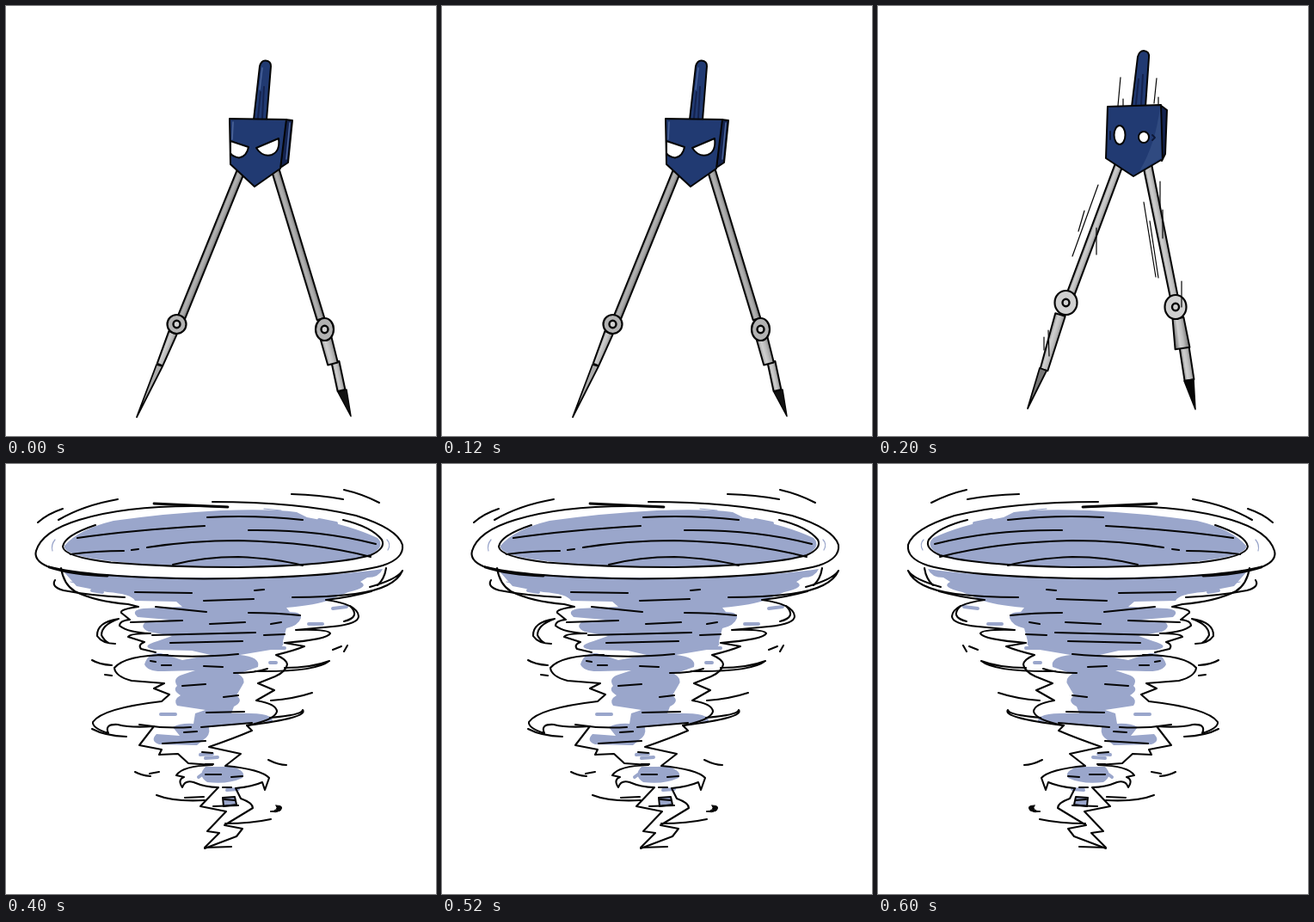
These frames come from a looping animation (500 by 500 pixels, 0.8 s). An HTML page with a canvas:

```html
<!DOCTYPE html>
<html lang="en">
<head>
<meta charset="utf-8">
<title>Whirling compass</title>
<style>
html, body { margin: 0; width: 100%; height: 100%; overflow: hidden; background: #fff; }
canvas { display: block; width: 500px; height: 500px; }
</style>
</head>
<body>
<canvas id="stage" width="500" height="500"></canvas>
<script>
const ctx = document.getElementById('stage').getContext('2d');
const INK = '#050505', NAVY = '#213a72', DEEP = '#14234f', BLUE = '#9aa6cb';
const STEP = 200;

function stroke(d, width = 2.1, color = INK) {
  ctx.lineWidth = width;
  ctx.strokeStyle = color;
  ctx.stroke(new Path2D(d));
}

function shape(d, fill, width = 2) {
  ctx.fillStyle = fill;
  ctx.fill(new Path2D(d));
  if (width) stroke(d, width);
}

function oval(x, y, rx, ry, fill, width = 2) {
  ctx.beginPath();
  ctx.ellipse(x, y, rx, ry, 0, 0, Math.PI * 2);
  ctx.fillStyle = fill;
  ctx.fill();
  ctx.lineWidth = width;
  ctx.strokeStyle = INK;
  ctx.stroke();
}

// Metal rod between two points, shaded across its width.
function rod(x1, y1, x2, y2, w1, w2, tones) {
  const len = Math.hypot(x2 - x1, y2 - y1);
  const nx = (y1 - y2) / len, ny = (x2 - x1) / len;
  const a = w1 / 2, b = w2 / 2;
  const g = ctx.createLinearGradient(x1 + nx * a, y1 + ny * a, x1 - nx * a, y1 - ny * a);
  tones.forEach((c, i) => g.addColorStop(i / (tones.length - 1), c));
  shape(`M${x1 + nx * a} ${y1 + ny * a}L${x2 + nx * b} ${y2 + ny * b}` +
        `L${x2 - nx * b} ${y2 - ny * b}L${x1 - nx * a} ${y1 - ny * a}Z`, g);
}

function joint(x, y, rx, ry, fill) {
  oval(x, y, rx, ry, fill, 2.2);
  oval(x, y, 4, 4.2, '#d2d2d2', 2.4);
}

function compassWide() {
  const steel = ['#777', '#b4b4b4', '#a2a2a2', '#686868'];
  const pale = ['#999', '#d0d0d0', '#b8b8b8', '#888'];
  rod(273, 192, 204, 362, 9, 9, steel);
  rod(313, 190, 366, 364, 9, 9, steel);
  rod(194, 380, 179, 417, 10, 7, pale);
  shape('M175 417L182 419L152 478Z', '#aaa', 1.8);
  rod(383, 414, 390, 447, 9, 9, pale);
  rod(372, 386, 380, 416, 13, 12, pale);
  shape('M386 449L396 446L401 477Z', '#111', 1.5);
  joint(198.5, 370, 11, 11, '#b2b2b2');
  joint(370.5, 376, 10.5, 13, '#b2b2b2');

  shape('M288 132L295 70Q297 63 302 63.5Q308 64 308 70L303 132Z', NAVY);
  stroke('M293 130L296 100M298 130L300 94', 2, DEEP);
  stroke('M298 72L295 97', 1.5, '#4a649c');
  shape('M325 132L333 133L328 182L319 188Z', DEEP);
  shape('M260 131L326 132L319 189L289 210L261 184Z', NAVY);
  stroke('M264 135L263 155M330 136L326 178', 1.6, '#4c659b');
  shape('M261 157L282 164Q280 175 271 176.5Q263 175 261 171Z', '#fff');
  shape('M291 165L317 154Q319 169 309 173Q298 176 291 165Z', '#fff');
}

function compassClosing() {
  const steel = ['#888', '#d0d0d0', '#bdbdbd', '#888'];
  rod(280, 185, 224, 335, 9, 9, steel);
  rod(313, 184, 344, 337, 10, 9, steel);
  rod(212, 359, 193, 423, 12, 9, steel);
  shape('M188 421L196 424L174 468Z', '#777', 1.8);
  rod(356, 396, 362, 435, 11, 11, steel);
  rod(349, 363, 354, 398, 13, 17, steel);
  shape('M356 436L367 434L369 469Z', '#050505', 1.5);
  joint(218.5, 345, 13, 14, '#d0d0d0');
  joint(346, 350, 12.5, 14, '#d0d0d0');

  shape('M295 117L302 59Q304 52 309 52Q316 53 315 60L311 117Z', NAVY);
  stroke('M300 114L303 85M306 114L308 80', 2, DEEP);
  shape('M328 115L336 121L334 172L330 180Z', DEEP);
  shape('M267 117L329 115L331 178L297 198L265 177Z', NAVY);
  shape('M328 117L329 177L304 192Q323 160 328 117Z', '#304a80', 0);
  oval(281, 150, 6.5, 11, '#fff');
  oval(309, 152.5, 6, 6.5, '#fff');
  stroke('M270 146V155M319 150L322 153L319 156', 1.8, '#0c1736');
  stroke('M282 83L279 116M324 84L321 113M285 108V116M326 106V114' +
    'M256 208L226 291M240 238L233 262M254 258V289' +
    'M309 228L323 315M316 250L326 316M328 204V235M331 237V270' +
    'M353 320V350M198 377L199 407M193 385V400', 1.2);
}

function funnelColor() {
  shape('M68 95Q84 76 125 66Q190 57 250 54Q310 52 338 56L350 62Q400 71 432 86' +
    'Q443 97 420 107Q380 118 270 119.5Q150 119 95 109Q66 103 68 95Z', BLUE, 0);
  shape('M67 125Q180 135 330 131Q400 128 438 122Q434 132 420 132L412 137' +
    'Q424 143 398 149L376 158Q362 164 326 167L330 172Q344 172 343 179' +
    'Q340 188 326 191L322 206Q325 214 308 216L272 222Q296 224 293 236' +
    'L270 244Q280 250 275 257L268 269Q277 276 265 282L262 290' +
    'Q312 288 310 299L236 306Q238 316 229 321L222 327L178 326' +
    'Q167 322 175 314L202 316L194 306Q203 301 218 302L220 290' +
    'L232 286L199 281Q194 274 203 269Q193 263 199 258Q193 249 205 245' +
    'L220 240L184 241Q165 242 161 233Q165 219 180 220L205 228L238 222' +
    'L216 217L172 216Q155 212 176 206L193 200L166 195Q155 190 162 184' +
    'L190 181L153 178Q144 170 160 168L205 166L198 160L150 159Q146 151 118 149' +
    'L82 142Z', BLUE, 0);
  shape('M232 352H263Q280 357 275 365Q258 373 234 370Q222 362 232 352Z', BLUE, 0);
  shape('M252 388L266 387L268 396L253 398Z', BLUE, 2);
  stroke('M257 379L270 378M232 342L246 341M226 338L240 337M228 361L224 364' +
    'M352 186H368M380 168L396 166M305 214H324M307 231H314' +
    'M180 291H197M100 147L112 149M405 81H412M364 65L384 69', 4, BLUE);
  stroke('M75 137L98 142M300 52L320 54M57 88Q52 94 54 101M443 88Q448 93 444 100', 1.2, BLUE);
}

function funnelRim() {
  stroke('M258 50Q150 45 85 65Q42 78 35 101Q32 112 48 119Q96 132 230 133.5' +
    'Q390 132 438 118Q463 110 461 94Q455 75 407 60Q340 44 240 44');
  stroke('M172 46L258 50M50 120Q78 129 118 130', 2.8);
  stroke('M104 71Q68 83 66 96Q67 108 122 114.500Q190 120 270 120' +
    'Q382 118 424 106Q442 98 437 88Q425 73 392 65');
  stroke('M83 86Q145 77 231 72M234 62Q290 59 345 65M282 77Q365 76 430 93' +
    'M75 105Q105 101 137 101M146 100L154 99M164 97Q215 89 270 89Q360 91 424 108' +
    'M194 117Q230 108 270 108Q315 110 345 118');
}

function funnelEdges() {
  // Left side
  stroke('M64 121Q67 140 80 148Q104 160 142 163L154 166Q132 169 134 173L144 181' +
    'Q132 182 132 188Q142 196 168 197Q144 197 142 201L161 207Q153 210 157 215L174 219' +
    'M188 222Q139 222 126 237Q127 247 146 252L184 255L172 261L190 268L181 276' +
    'Q112 284 101 300Q100 307 119 313Q114 302 130 303Q145 307 172 305' +
    'L155 327L181 332L178 338L200 337L212 348L240 350' +
    'Q205 351 198 362L207 364Q199 367 205 376Q208 367 218 370Q232 376 247 376' +
    'L226 398L256 404L234 427L248 429L231 446L262 445');
  // Right side
  stroke('M442 121Q440 134 432 141M425 148Q400 155 372 158Q409 163 410 177' +
    'Q410 186 380 189L337 193Q375 192 377 197Q374 204 324 208L347 212' +
    'Q335 217 314 222Q326 227 327 233Q326 241 313 247L293 255' +
    'L312 263L291 275Q315 279 315 288Q312 298 280 304L286 310' +
    'Q265 319 236 329L273 337L255 351Q297 355 306 365' +
    'L301 379L298 370Q287 375 267 377L273 389Q287 394 287 400L254 420' +
    'L275 424L268 433L231 447');
}

function funnelMarks() {
  stroke('M150 149L216 150M230 159L288 157M289 147L300 146M174 166L233 172' +
    'M282 173Q315 173 342 176M237 186L278 184M145 184L205 182M308 186L320 184' +
    'M170 199L290 196M191 208L275 206M300 199L324 198M177 222Q220 226 270 221' +
    'M168 229L174 230M181 234L192 234M230 235L252 236M265 243Q290 243 304 238' +
    'M205 258L232 256M253 271L270 269M233 289L277 288M155 303Q185 308 215 306' +
    'M227 306L286 301M207 312L222 311M182 325L232 322M228 335L240 336' +
    'M232 361L250 361M262 364L275 363M232 349H241M252 376H262M241 398L270 397' +
    'M254 390L266 391');
}

function funnelSwirls() {
  stroke('M37 68Q48 58 66 52M61 65Q90 48 130 41M332 35Q365 36 392 41M393 30Q415 35 434 45');
  stroke('M57 135Q52 143 67 147Q98 153 138 155M461 124Q452 145 406 151Q375 155 333 155' +
    'M461 124Q455 134 423 143M131 180Q105 184 106 200Q112 209 127 209' +
    'M131 180Q111 187 111 199Q114 205 119 208M400 165Q413 178 393 183');
  stroke('M100 228Q108 233 123 234M115 245L123 246M380 216L390 212M393 218L397 211' +
    'M376 229Q360 242 290 241M376 229Q355 237 324 237M308 275Q335 273 356 266' +
    'M345 286Q352 295 280 304M345 286Q344 292 307 295M100 308Q115 316 140 317' +
    'M150 358Q157 362 168 363M167 360L178 358M326 350Q317 350 305 344' +
    'M175 385Q195 393 231 391M208 388L230 387M308 413Q285 418 255 418');
  shape('M314 397Q324 397 319 403Q314 406 307 404Q318 403 314 397Z', INK, 1);
}

function tornado() {
  funnelColor();
  funnelRim();
  funnelEdges();
  funnelMarks();
  funnelSwirls();
}

function mirrored(draw) {
  ctx.translate(496, 0);
  ctx.scale(-1, 1);
  draw();
}

const poses = [compassWide, compassClosing, tornado, () => mirrored(tornado)];
const start = performance.now();

function render() {
  const t = performance.now() - start;
  ctx.setTransform(1, 0, 0, 1, 0, 0);
  ctx.fillStyle = '#fff';
  ctx.fillRect(0, 0, 500, 500);
  ctx.lineCap = ctx.lineJoin = 'round';
  poses[Math.floor(t / STEP) % poses.length]();
  requestAnimationFrame(render);
}
render();
</script>
</body>
</html>
```
